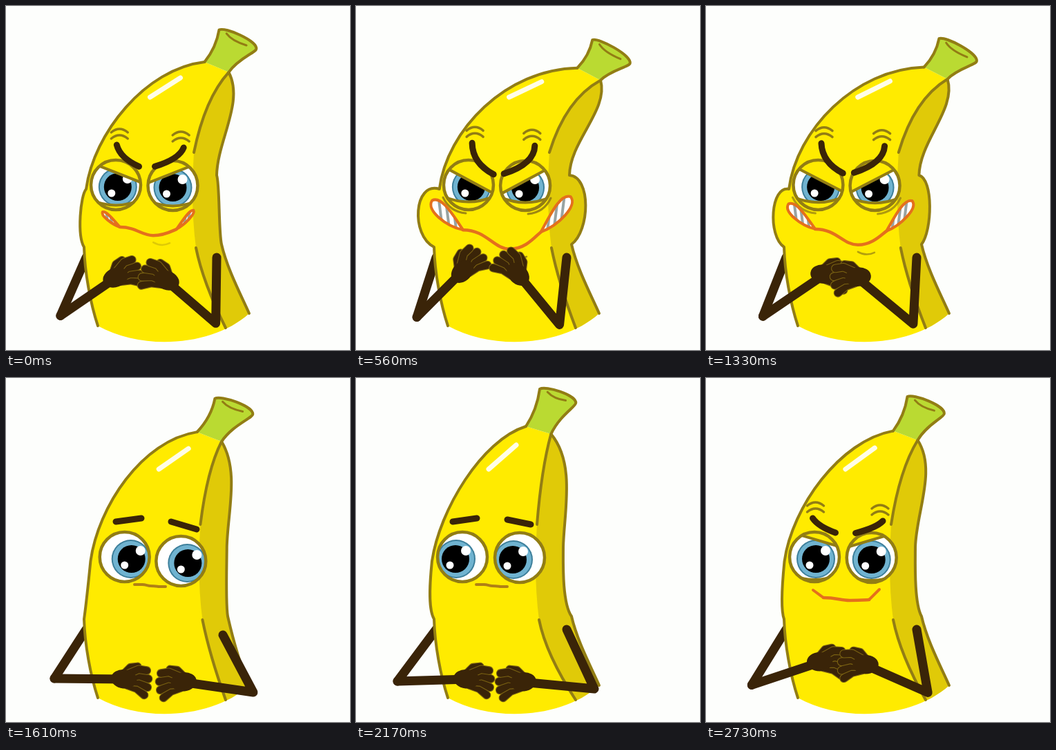
Write an HTML page with a canvas that moves like this. It is 498 px wide and 498 px high and loops after 2800 ms.

```html
<!DOCTYPE html>
<html lang="en">
<head>
<meta charset="utf-8">
<title>Scheming banana</title>
<style>
html, body { margin: 0; width: 100%; height: 100%; overflow: hidden; background: #fdfefc; }
canvas { display: block; width: 498px; height: 498px; }
</style>
</head>
<body>
<canvas id="stage" width="498" height="498"></canvas>
<script>
const ctx = document.getElementById('stage').getContext('2d');
const LOOP = 2800, STEP = 70;
const PAPER = '#fdfefc', YELLOW = '#ffeb00', SHADE = '#e0ca08', OLIVE = '#927d14', BROWN = '#3a2408';

// The whole figure follows six controls: body lean, grin, mad eyes, gaze, hand height, hand gap.
const pose = (lean, grin, mad, look, lift, apart) => ({ lean, grin, mad, look, lift, apart });
const ready = pose(.5, .3, .7, 0, .78, .6);
const grinning = pose(.83, .8, .95, 0, .92, .65);
const widest = pose(1, 1, 1, 0, 1, 1);
const clasping = pose(.84, .7, .93, 0, .85, 0);
const jolted = pose(-.1, 0, 0, .6, .2, .9);
const sadRight = pose(.37, 0, 0, 1, 0, .9);
const sadLeft = pose(0, 0, 0, -1, 0, .8);
const smirking = pose(.3, 0, .5, 0, .45, .4);

const smooth = u => u * u * (3 - 2 * u);
const easeOut = u => 1 - (1 - u) ** 2;
const easeIn = u => u * u;
const keys = [
  [0, ready, easeOut], [350, grinning, smooth], [840, widest, smooth], [1330, clasping, easeIn],
  [1470, jolted, smooth], [1610, sadRight, smooth], [1820, sadRight, smooth], [2100, sadLeft, smooth],
  [2450, sadLeft, easeIn], [2730, smirking, easeIn], [LOOP, ready]
];

const mix = (a, b, u) => a + (b - a) * u;
const mixPoint = (a, b, u) => a.map((v, i) => mix(v, b[i], u));
const rad = d => d * Math.PI / 180;

function poseAt(t) {
  const i = keys.findIndex(k => k[0] > t);
  const [t0, from, ease] = keys[i - 1], [t1, to] = keys[i];
  const u = ease((t - t0) / (t1 - t0)), now = {};
  for (const k in from) now[k] = mix(from[k], to[k], u);
  now.turn = Math.max(0, now.look);
  return now;
}

function stroke(path, color, width) {
  ctx.strokeStyle = color;
  ctx.lineWidth = width;
  ctx.stroke(path);
}

function fill(path, color) {
  ctx.fillStyle = color;
  ctx.fill(path);
}

function line(color, width, ...pts) {
  const p = new Path2D();
  for (let i = 0; i < pts.length; i += 2) p.lineTo(pts[i], pts[i + 1]);
  stroke(p, color, width);
}

function curve(color, width, x, y, ...c) {
  const p = new Path2D();
  p.moveTo(x, y);
  p.quadraticCurveTo(...c);
  stroke(p, color, width);
}

function disc(x, y, r, color) {
  const p = new Path2D();
  p.arc(x, y, r, 0, 7);
  fill(p, color);
  return p;
}

function clipped(path, draw) {
  ctx.save();
  ctx.clip(path);
  draw();
  ctx.restore();
}

function drawStem(bx, by, ex, ey, { lean, turn }) {
  const tx = 266 + 85 * lean + 5 * turn, ty = 16 + 37 * lean;
  const len = 56 + 9 * lean, tilt = rad(21 + 12 * lean - 3 * turn);
  const c = Math.cos(tilt), s = Math.sin(tilt);
  const at = (u, v) => [tx + u * c - v * s, ty + u * s + v * c];
  const [ux, uy] = at(len, 0);

  const stem = new Path2D();
  stem.moveTo(bx, by);
  stem.quadraticCurveTo(mix(bx, tx, .8), mix(by, ty, .45), tx, ty);
  stem.bezierCurveTo(...at(6, -8), ...at(len - 4, -11), ux, uy);
  stem.bezierCurveTo(...at(len + 2, 5), mix(ex, ux, .35), mix(ey, uy, .6), ex, ey);
  fill(stem, '#bada32');
  stroke(stem, OLIVE, 4);
  curve(OLIVE, 3, ...at(12, 0), ...at(24, 6), ...at(len - 15, 2));
}

function drawBody(p) {
  const { lean, turn, grin } = p;
  const bx = 246 + 83 * lean, by = 70 + 22 * lean, tilt = rad(17 + 12 * lean);
  const ex = bx + 38 * Math.cos(tilt), ey = by + 38 * Math.sin(tilt);
  const lx = 110 + 12 * lean + 8 * turn, rx = 300 + 10 * lean + 16 * turn;
  const qx = 262 + 20 * lean + 12 * turn, qy = 212;
  const puffL = 2 + 43 * grin ** 1.6, puffR = 40 * grin ** 1.8;
  const hip = 312 + 9 * turn;

  const traceLeft = path => {
    path.lineTo(bx, by);
    path.bezierCurveTo(bx - 64 - 44 * lean, by + 20 * (1 - lean), lx + 11, 191 - 13 * lean, lx, 265);
    path.bezierCurveTo(lx - puffL, 285 - 36 * grin, lx - puffL - 5, 332, 113, 349);
    path.bezierCurveTo(114, 385, 122, 430, 133, 463);
  };
  const traceRight = path => {
    path.moveTo(352, 445);
    path.bezierCurveTo(340, 418, hip + 8, 380, hip, 345);
    path.bezierCurveTo(rx - 2 + puffR, 325, rx + puffR, 265 - 20 * grin, rx, 245);
    path.bezierCurveTo(rx + 1, 195, ex + 36 - 27 * lean, ey + 43, ex, ey);
  };
  const left = new Path2D(), right = new Path2D(), whole = new Path2D();
  traceLeft(left);
  traceRight(right);
  traceRight(whole);
  traceLeft(whole);
  whole.bezierCurveTo(200, 500, 300, 492, 352, 445);
  fill(whole, YELLOW);

  const kx = mix(qx, ex, .32), ky = ey + 50 - 25 * lean;
  const ridge = [ex, ey, kx, ky, qx, qy];
  const crease = [qx + 3, 350, qx + 13, 400, 318, 466];
  const shade = new Path2D();
  shade.moveTo(ex, ey);
  shade.quadraticCurveTo(kx, ky, qx, qy);
  shade.quadraticCurveTo(qx - 5, 290, qx + 3, 350);
  shade.quadraticCurveTo(...crease.slice(2));
  shade.lineTo(410, 470);
  shade.lineTo(410, ey);
  clipped(whole, () => fill(shade, SHADE));
  curve(OLIVE, 4, ...ridge);
  curve(OLIVE, 4, ...crease);
  stroke(left, OLIVE, 4);
  stroke(right, OLIVE, 4);

  const hx = 192 + 33 * lean + 17 * turn;
  line('#fffde6', 7, hx, 132, hx + 40 + 8 * lean, 97 + 14 * lean);
  drawStem(bx, by, ex, ey, p);
}

function drawEye(x, y, side, { mad, look }) {
  const upper = -44 + 39 * mad, lower = 42 - 18 * mad, slope = rad((4 + 25 * mad) * side);
  const gaze = 9 * look + 4 * mad * (side > 0);
  const cover = (edge, bend, far) => {
    const lid = new Path2D();
    lid.moveTo(-50, edge - bend);
    lid.quadraticCurveTo(0, edge + bend, 50, edge - bend);
    lid.lineTo(50, far);
    lid.lineTo(-50, far);
    lid.closePath();
    fill(lid, YELLOW);
    stroke(lid, OLIVE, 4);
  };
  const eye = disc(x, y, 36, '#fff');
  clipped(eye, () => {
    const px = x + gaze, py = y + 3;
    disc(px, py, 28, '#3d7f9b');
    disc(px, py, 26, '#70b3d0');
    disc(px + look, py, 20, '#000');
    disc(px + 14, py - 12, 7, '#fff');
    disc(px - 9, py + 9, 5.5, '#fff');
    ctx.translate(x, y);
    cover(lower, 15, 60);
    ctx.rotate(slope);
    cover(upper, 0, -90);
  });
  stroke(eye, OLIVE, 4.5);
  ctx.globalAlpha = Math.max(0, mad * 4 - 3);
  curve(OLIVE, 3, x - 37 * side, y + 18, x - 27 * side, y + 39, x - 4 * side, y + 41);
  ctx.globalAlpha = 1;
}

function drawBrow(ox, oy, ix, iy, side, mad) {
  ctx.globalAlpha = Math.min(1, mad * 2);
  for (const rise of [9, 18]) {
    curve(OLIVE, 3.5, ox - 8 * side, oy - rise, ox + 4 * side, oy - rise - 10, ox + 16 * side, oy - rise);
  }
  ctx.globalAlpha = 1;
  const kx = mix((ox + ix) / 2, ox, mad), ky = mix(oy, iy, .5 + .15 * mad);
  curve(BROWN, 9, ox, oy, kx, ky, ix, iy);
}

function drawFace(p) {
  const { lean, turn, mad } = p;
  drawEye(154 + 10 * lean + 14 * turn, 259, 1, p);
  drawEye(237 + 9 * lean + 13 * turn, 260 + 5 * turn, -1, p);
  drawBrow(140 + 29 * mad + 19 * turn, 208 - 10 * mad, 175 + 25 * mad + 21 * turn, 203 + 42 * mad, 1, mad);
  drawBrow(253 + 6 * mad + 23 * turn, 212 - 10 * mad + 7 * turn, 219 - 5 * mad + 20 * turn, 205 + 39 * mad + 3 * turn, -1, mad);
}

function drawTeeth([ax, ay], [bx, by], side, open, color) {
  const dx = bx - ax, dy = by - ay, len = Math.hypot(dx, dy);
  const nx = -dy / len * side * open, ny = dx / len * side * open;
  const at = (u, off) => [ax + dx * u + nx * off, ay + dy * u + ny * off];
  const gum = new Path2D();
  gum.moveTo(ax, ay);
  gum.bezierCurveTo(...at(.08, -17), ...at(.6, -6), bx, by);
  gum.bezierCurveTo(...at(.65, 15), ...at(.05, 19), ax, ay);
  fill(gum, '#fff');
  clipped(gum, () => {
    for (let i = 1; i < 4; i++) {
      const [x, y] = at(i / 4, 0);
      line('#98a3a2', 4, x - 3 * side, y - 24, x + 3 * side, y + 24);
    }
  });
  stroke(gum, color, 4);
}

// Corner, inner corner, middle, inner corner, corner.
const lips = {
  flat: [[174, 299], [185, 299], [197, 301], [209, 302], [219, 302]],
  smirk: [[155, 307], [170, 318], [208, 322], [236, 321], [251, 306]],
  grin: [[104, 278], [153, 325], [225, 356], [272, 328], [319, 272]]
};

function drawMouth({ grin, mad, turn }) {
  const smile = Math.min(1, mad * 2);
  const [a, b, m, c, d] = lips.flat.map((pt, i) => {
    const [x, y] = mixPoint(mixPoint(pt, lips.smirk[i], smile), lips.grin[i], grin);
    return [x + 12 * turn, y];
  });
  const color = `rgb(${mixPoint([176, 128, 22], [228, 112, 28], smile).map(Math.round)})`;
  const lip = new Path2D();
  lip.moveTo(...b);
  lip.bezierCurveTo(mix(b[0], m[0], .5), b[1], mix(m[0], b[0], .35), m[1], ...m);
  lip.bezierCurveTo(mix(m[0], c[0], .5), m[1], mix(c[0], m[0], .2), mix(c[1], m[1], .3), ...c);
  stroke(lip, color, 4 + smile * .5);
  drawTeeth(a, b, 1, grin, color);
  drawTeeth(d, c, -1, grin, color);
  ctx.globalAlpha = grin;
  curve(OLIVE, 2.5, m[0], m[1] + 10, m[0] + 12, m[1] + 17, m[0] + 24, m[1] + 11);
  ctx.globalAlpha = 1;
}

function drawHand(x, y, angle, side) {
  ctx.save();
  ctx.translate(x, y);
  ctx.scale(side * 1.1, 1.1);
  ctx.rotate(rad(angle));
  const finger = (...pts) => {
    line('#7a6212', 11.5, ...pts);
    line(BROWN, 9.5, ...pts);
  };
  finger(-4, -5, 5, -16, 14, -18);
  for (let k = 1.5; k >= -1.5; k--) {
    const a = rad(k * 12), r = 31 - Math.abs(k) * 2, y0 = k * 5;
    const c = r * Math.cos(a), s = r * Math.sin(a);
    finger(3, y0, c * .6, y0 + s * .6 - 2, c, y0 + s + 2);
  }
  const palm = new Path2D();
  palm.ellipse(-2, 0, 17, 12.5, 0, 0, 7);
  fill(palm, BROWN);
  ctx.restore();
}

function draw(t) {
  const p = poseAt(t), { lift, apart, turn } = p;
  const elbowL = [60 + 31 * lift ** 2 + 10 * turn, 439 + 12 * lift - 4 * turn];
  const elbowR = [345 - 53 * lift + 13 * turn, 450 + 12 * lift + 5 * turn];
  const mid = 201 - 7 * lift + 13 * turn, gap = 23 + 20 * apart;
  const y = 436 - 56 * lift, angle = 6 - 74 * lift ** 2 * apart;

  ctx.fillStyle = PAPER;
  ctx.fillRect(0, 0, 498, 498);
  ctx.lineCap = ctx.lineJoin = 'round';

  line(BROWN, 13, 116, 364, ...elbowL);
  drawBody(p);
  drawFace(p);
  drawMouth(p);
  line(BROWN, 13, ...elbowL, mid - gap, y);
  line(BROWN, 13, 305 + 9 * turn, 364 + 8 * turn, ...elbowR, mid + gap, y + 4);
  drawHand(mid - gap, y, angle, 1);
  drawHand(mid + gap, y + 4, angle, -1);
}

const start = performance.now();
function tick() {
  const t = (performance.now() - start) % LOOP;
  draw(Math.floor(t / STEP) * STEP);
  requestAnimationFrame(tick);
}
tick();
</script>
</body>
</html>
```
